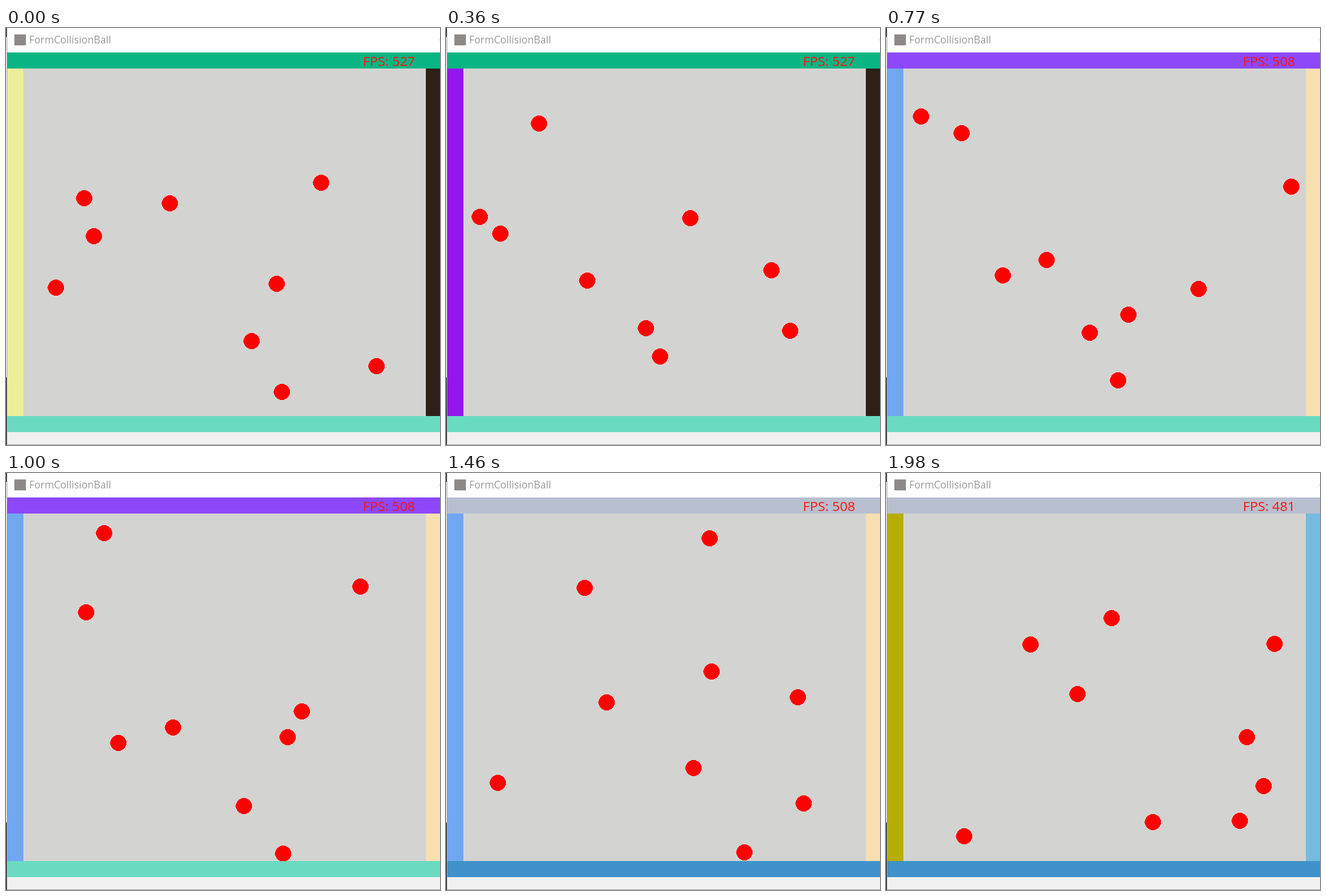
An HTML page with a canvas that plays this animation: 674 by 648 pixels, repeating every 2.03 s.

```html
<!DOCTYPE html>
<html lang="en">
<head>
<meta charset="utf-8">
<title>Bouncing balls</title>
<style>
  html, body { margin: 0; width: 100%; height: 100%; overflow: hidden; background: #fff; }
  canvas { display: block; width: 674px; height: 648px; }
</style>
</head>
<body>
<canvas id="stage" width="674" height="648"></canvas>
<script>
const ctx = document.getElementById('stage').getContext('2d');
const LOOP = 2030;
const FONT = '"Open Sans", "Noto Sans", sans-serif';

// Pacing: [picture index, time in ms, simulation step]
const pace = [
  [0, 0, 0], [1, 30, 2.75], [8, 360, 22], [13, 590, 36], [22, 1000, 62],
  [24, 1100, 67.7], [25, 1150, 70.6], [29, 1330, 82], [36, 1660, 100],
  [37, 1710, 102.9], [43, 1980, 120]
];

// Start, velocity per step, and the steps at which each axis reverses
const balls = [
  { x: 77,    y: 403,   vx: -2.5,   vy: -5,     fx: [16],         fy: [66] },
  { x: 420,   y: 397,   vx: -5,     vy: 3.125,  fx: [30, 104],    fy: [62] },
  { x: 428,   y: 565,   vx: -4.375, vy: -2.5,   fx: [30, 110],    fy: [] },
  { x: 381,   y: 486,   vx: 5.625,  vy: -5,     fx: [46],         fy: [82] },
  { x: 121,   y: 263.5, vx: -3.75,  vy: 2.5,    fx: [16, 54, 98], fy: [] },
  { x: 136.3, y: 323.4, vx: 3.75,   vy: 3.125,  fx: [],           fy: [86] },
  { x: 575,   y: 525,   vx: -1.875, vy: -2.5,   fx: [],           fy: [] },
  { x: 489,   y: 240,   vx: -5,     vy: 2.5,    fx: [54],         fy: [] },
  { x: 254,   y: 272,   vx: -5,     vy: -5.625, fx: [44],         fy: [36] }
];

// Walls take a new colour when hit: [step, colour]
const walls = [
  { box: [2, 63, 25, 540],   hues: [[0, '#ecee98'], [17, '#9416ec'], [44, '#70a7f2'], [98, '#b5ae00']] },
  { box: [652, 63, 22, 540], hues: [[0, '#2e2019'], [46, '#f7dfb0'], [104, '#75bbe0']] },
  { box: [2, 38, 672, 25],   hues: [[0, '#09b583'], [36, '#8d48fa'], [67, '#fc25fa'], [83, '#b8bfce']] },
  { box: [2, 603, 672, 25],  hues: [[0, '#6adbc0'], [63, '#ea659c'], [87, '#3f92c9']] }
];

const fps = [[0, 527], [470, 508], [1470, 481]];

// One entry per picture, interpolated between the pacing points
const ticks = [];
for (let i = 0; i < pace.length - 1; i++) {
  const [k0, t0, s0] = pace[i], [k1, t1, s1] = pace[i + 1];
  for (let k = k0; k < k1; k++) {
    const u = (k - k0) / (k1 - k0);
    ticks.push([Math.round((t0 + (t1 - t0) * u) / 10) * 10, Math.round(s0 + (s1 - s0) * u)]);
  }
}
ticks.push(pace[pace.length - 1].slice(1));

function latest(list, at) {
  let value = list[0][1];
  for (const [start, v] of list) if (start <= at) value = v;
  return value;
}

function travel(p, v, flips, step) {
  let last = 0;
  for (const f of flips) {
    if (f >= step) break;
    p += v * (f - last);
    v = -v;
    last = f;
  }
  return p + v * (step - last);
}

function rect(color, x, y, w, h) {
  ctx.fillStyle = color;
  ctx.fillRect(x, y, w, h);
}

function label(text, x, y, size, color) {
  ctx.font = size + 'px ' + FONT;
  ctx.fillStyle = color;
  ctx.fillText(text, x, y);
}

// Hard-edged disc with a one-pixel nub on the left
function disc(x, y) {
  ctx.fillStyle = '#f00';
  for (let d = -12; d <= 12; d++) {
    const h = Math.floor(Math.sqrt(12.4 * 12.4 - d * d));
    ctx.fillRect(x - h, y + d, 2 * h + 1, 1);
  }
  ctx.fillRect(x - 13, y, 1, 1);
}

function draw(time) {
  const step = latest(ticks, time);

  rect('#fff', 0, 0, 674, 648);
  rect('#a3a3a3', 1, 0, 1, 648);
  rect('#0d1a2c', 0, 0, 1, 14);
  rect('#0d1a2c', 0, 543, 1, 105);
  rect('#8f8a88', 13, 10, 18, 17);
  label('FormCollisionBall', 35.9, 24, 15.7, '#999');
  rect('#999', 673, 18, 1, 1);

  rect('#d3d3d1', 27, 63, 625, 540);
  for (const b of balls) {
    disc(Math.round(travel(b.x, b.vx, b.fx, step)), Math.round(travel(b.y, b.vy, b.fy, step)));
  }
  for (const w of walls) rect(latest(w.hues, step), ...w.box);
  label('FPS: ' + latest(fps, time), 554.2, 59, 20.8, '#fa1414');

  rect('#f0f0f0', 2, 628, 672, 19);
  rect('#a9a9a9', 1, 647, 673, 1);
}

const begin = performance.now();
function loop() {
  draw((performance.now() - begin) % LOOP);
  requestAnimationFrame(loop);
}
loop();
</script>
</body>
</html>
```
